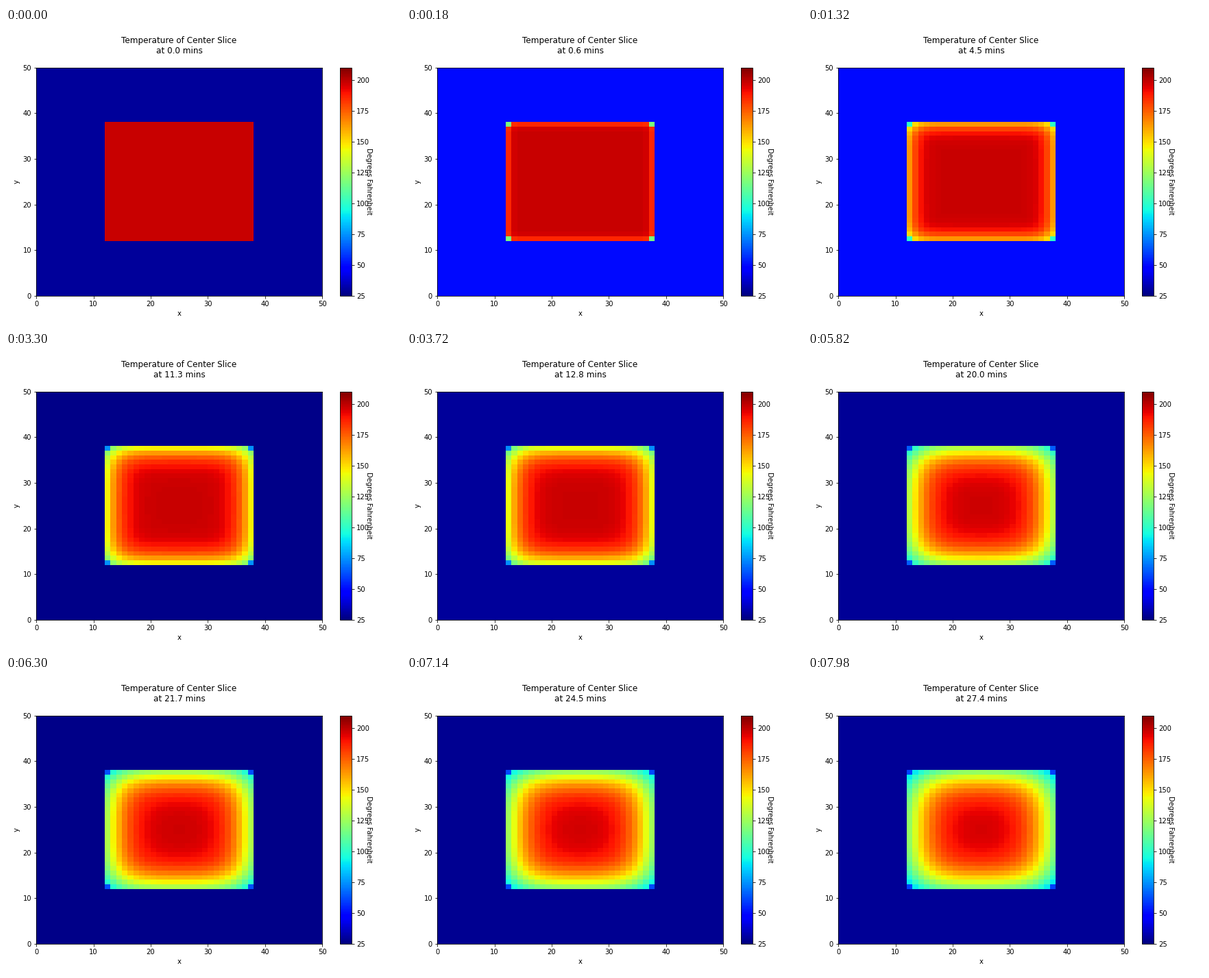
A matplotlib script that plays this animation: 576 px wide and 432 px high, repeating every 8 s.

```python
import numpy as np
import matplotlib.pyplot as plt
from matplotlib.animation import FuncAnimation

W, H, DPI = 576, 432, 72
INTERVAL, FRAMES, HOLD = 20, 400, 3   # a new step every 3 ticks (60 ms)
STEPS = (FRAMES - 1) // HOLD + 1
MINUTES = 0.2063                      # simulated minutes per step
N, LO, HI = 50, 12, 38                # grid size and extent of the hot block
HOT = 198.0
DIFFUSION, CONVECTION = 0.1025, 0.168


def ambient(step):
    """Air temperature: cool room first, then a cycling freezer."""
    t = step * MINUTES
    if step == 0:
        return 30.0
    if t < 10:
        return 50.0
    return 25 + 5 * ((t - 10.6) / 2.5 % 1)


def second_diff(T, air):
    """Second difference along axis 0 with convecting end faces."""
    d = np.empty_like(T)
    d[1:-1] = T[2:] - 2 * T[1:-1] + T[:-2]
    d[0] = 2 * (T[1] - T[0] - CONVECTION * (T[0] - air))
    d[-1] = 2 * (T[-2] - T[-1] - CONVECTION * (T[-1] - air))
    return d


def advance(T, air):
    return T + DIFFUSION * (second_diff(T, air) + second_diff(T.T, air).T)


def average_corners(T, air):
    """Copy of the block whose corners average their four neighbours."""
    T = T.copy()
    for r, r_in in ((0, 1), (-1, -2)):
        for c, c_in in ((0, 1), (-1, -2)):
            T[r, c] = (T[r_in, c] + T[r, c_in] + 2 * air) / 4
    return T


def simulate():
    block = np.full((HI - LO, HI - LO), HOT)
    fields = []
    for step in range(STEPS):
        air = ambient(step)
        field = np.full((N, N), air)
        if step:
            block = advance(block, air)
            field[LO:HI, LO:HI] = average_corners(block, air)
        else:
            field[LO:HI, LO:HI] = block
        fields.append(field)
    return fields


def px_axes(x, y, w, h):
    return fig.add_axes([x / W, y / H, w / W, h / H])


def title(step):
    return f"Temperature of Center Slice\nat {step * MINUTES:.1f} mins\n"


fields = simulate()

fig = plt.figure(figsize=(W / DPI, H / DPI), dpi=DPI, facecolor="white")
ax = px_axes(44.1, 41.2, 417, 333)
image = ax.imshow(fields[0], cmap="jet", vmin=25, vmax=210, origin="lower",
                  extent=(0, N, 0, N), aspect="auto", interpolation="nearest")
ax.set_xticks(range(0, 51, 10))
ax.set_yticks(range(0, 51, 10))
ax.set_xlabel("x")
ax.set_ylabel("y")
heading = ax.set_title(title(0))

bar = fig.colorbar(image, cax=px_axes(487.2, 41.2, 16.65, 333),
                   ticks=range(25, 201, 25))
bar.set_label("Degrees Fahrenheit", rotation=270)


def update(frame):
    step = frame // HOLD
    image.set_data(fields[step])
    heading.set_text(title(step))
    return image, heading


anim = FuncAnimation(fig, update, frames=FRAMES, interval=INTERVAL,
                     repeat=True, repeat_delay=0, blit=False)
plt.show()
```
